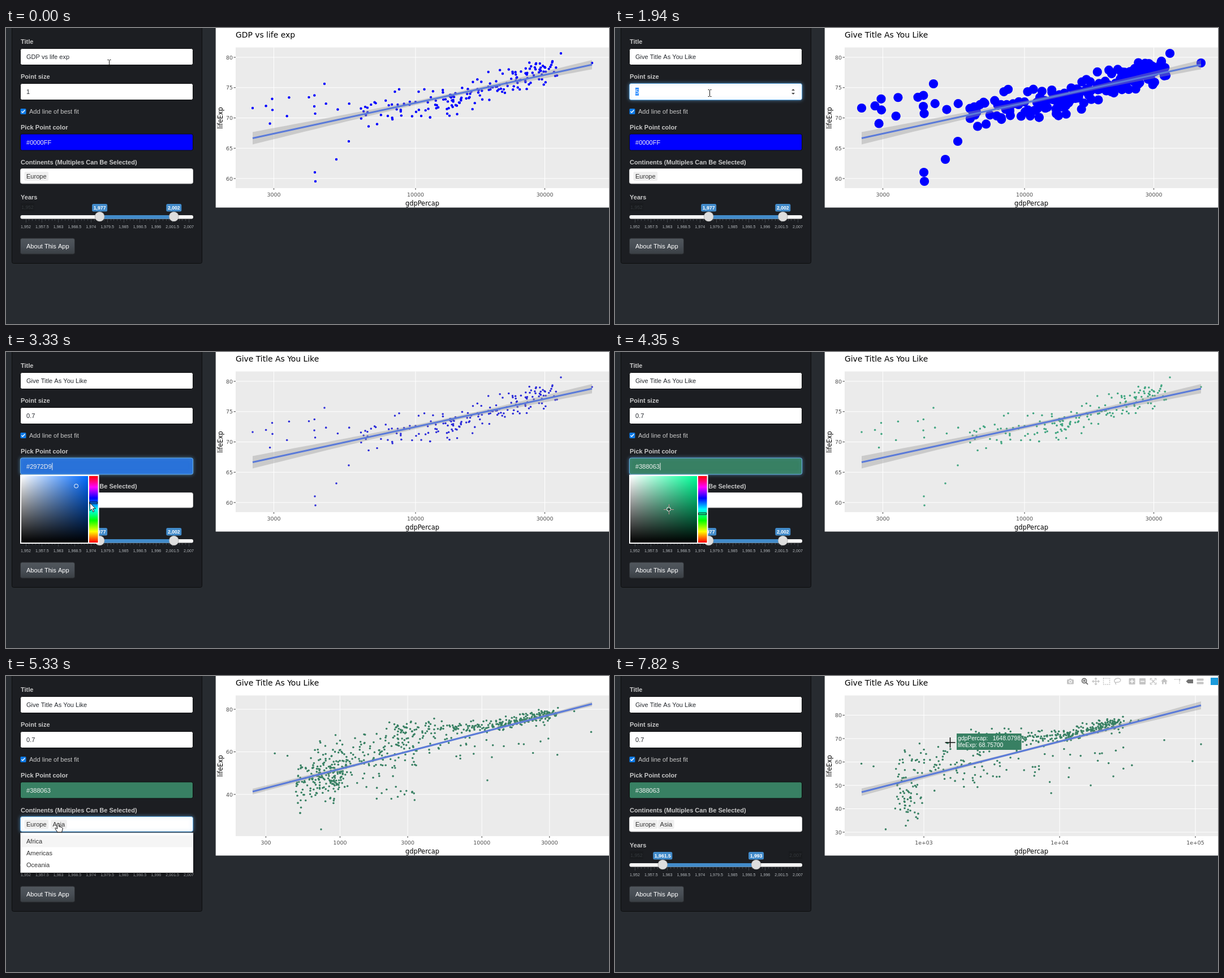
Write an HTML page with a canvas that moves like this. It is 1066x525 px and loops after 8000 ms.

```html
<!DOCTYPE html>
<html>
<head>
<meta charset="utf-8">
<style>
html, body { margin: 0; width: 100%; height: 100%; overflow: hidden; background: #272b30; }
canvas { display: block; }
</style>
</head>
<body>
<canvas id="stage" width="1066" height="525"></canvas>
<script>
const c = document.getElementById('stage').getContext('2d');
const SANS = '"Liberation Sans", Arial, sans-serif';
const WIDE = '"DejaVu Sans", Verdana, sans-serif';
const LOOP = 8000, GREEN = '#388063';

// ---- data ----
let seed = 11;
const rnd = () => {
  seed = seed + 0x6D2B79F5 | 0;
  let v = Math.imul(seed ^ seed >>> 15, 1 | seed);
  v = v + Math.imul(v ^ v >>> 7, 61 | v) ^ v;
  return ((v ^ v >>> 14) >>> 0) / 4294967296;
};
const gauss = sd => (rnd() + rnd() + rnd() - 1.5) * 2 * sd;

// x: pixel of 1000, k: pixels per decade, y: pixel of 80, q: pixels per year of life
// fit: line ends, ribbon half-width, where the ribbon is narrowest
const log3 = [300, 1000, 3000, 10000, 30000], tens = [30, 40, 50, 60, 70, 80];
const powers = [1e3, 1e4, 1e5];
const axes = {
  europe: { x: 245, k: 479, y: 52, q: 10.75, xt: log3.slice(2), yt: [60, 65, 70, 75, 80], fit: [195.5, 65, 11, .58] },
  africa: { x: 590.5, k: 250.7, y: 59, q: 3.775, xt: log3, yt: [40, 60, 80], fit: [205, 49.5, 5, .57] },
  asia: { x: 559.5, k: 268.5, y: 54.5, q: 4.46, xt: log3, yt: tens, fit: [179.5, 49.5, 6.5, .6] },
  early: { x: 546, k: 240, y: 69.5, q: 4.15, xt: powers, yt: tens, sci: true, fit: [206, 52, 6.5, .48] },
  wide: { x: 546, k: 240, y: 61, q: 4.32, xt: powers, yt: tens, sci: true, fit: [205, 44, 6, .48] }
};
const toX = (a, lg) => a.x + a.k * (lg - 3);
const toY = (a, life) => a.y + a.q * (80 - life);

// A few lone points, then clouds along a segment: count, x0, y0, x1, y1, spread
function sample(a, lone, ...clouds) {
  const pts = lone.split(' ').map(p => p.split(',').map(Number));
  for (const [n, x0, y0, x1, y1, sd] of clouds)
    for (let i = 0; i < n; i++) {
      const u = rnd();
      pts.push([x0 + (x1 - x0) * u + gauss(6), y0 + (y1 - y0) * u + gauss(sd)]);
    }
  return pts.map(([x, y]) => [3 + (x - a.x) / a.k, 80 - (y - a.y) / a.q]);
}
const europe = sample(axes.europe, '436,142 547,272 546,256 584,233 606,201 563,99 981,45 1036,62',
  [14, 440, 145, 640, 135, 14], [55, 630, 145, 800, 138, 15], [125, 775, 130, 975, 70, 12]);
const asia = sample(axes.asia, '436,147 460,152 484,272 847,155 971,150 1035,102',
  [24, 505, 190, 555, 210, 22], [62, 515, 155, 700, 108, 19], [55, 650, 100, 850, 93, 9],
  [36, 860, 84, 965, 66, 9], [18, 630, 170, 960, 125, 14]);
const africa = sample(axes.africa, '520,243 557,272 851,185',
  [165, 515, 190, 600, 170, 18], [90, 570, 178, 720, 130, 20], [25, 660, 115, 840, 110, 16], [12, 640, 205, 720, 208, 6]);
const past = sample(axes.early, '1036,121 1021,151 841,194 881,178',
  [32, 502, 185, 526, 235, 20], [38, 515, 165, 655, 170, 18], [14, 600, 195, 900, 160, 18]);

const sets = {
  europe, asia: [...europe, ...asia], africa: [...europe, ...asia, ...africa],
  wide: [...europe, ...asia, ...past],
  early: [...europe.map(([g, l]) => [g - .07, l - 1.3]), ...asia.filter(p => p[1] < 79), ...past]
};

// ---- timeline ----
const changes = [
  [0, { title: 'GDP vs life exp', field: 'GDP vs life exp', size: '1', dot: 1, color: '#0000ff', items: ['Europe'], plot: 'europe' }],
  [320, { focus: 'title' }],
  [390, { marked: 'title' }],
  [470, { field: 'Give Title As You Like', focus: 'size', marked: '' }],
  [790, { title: 'Give Title As You Like' }],
  [1100, { size: '2' }],
  [1330, { size: '3' }],
  [1490, { size: '5', fade: .25 }],
  [1720, { fade: .6 }],
  [1870, { dot: 5, fade: 0, marked: 'size' }],
  [2020, { size: '0.7', marked: '' }],
  [2420, { dot: .7 }],
  [2870, { focus: 'color', picker: true }],
  [3260, { color: '#2a2ad9' }],
  [3500, { color: '#2ad993' }],
  [4280, { color: '#40a580' }],
  [4510, { color: GREEN, picker: false, focus: '' }],
  [4660, { focus: 'items', rows: ['Asia'] }],
  [4810, { items: ['Europe', 'Asia'], rows: ['Africa', 'Americas', 'Oceania'], plot: 'asia' }],
  [4890, { items: ['Europe', 'Asia', 'Africa'], rows: ['Americas', 'Oceania'] }],
  [4970, { plot: 'africa' }],
  [5260, { items: ['Europe', 'Asia'], rows: ['Africa', 'Americas', 'Oceania'] }],
  [5480, { plot: 'asia' }],
  [5770, { rows: null, focus: '' }],
  [7100, { plot: 'wide' }],
  [7730, { plot: 'early' }],
  [7820, { hover: true }]
];

// Each move: start, end, then the values reached
const pointer = [[0, 0, 182, 62, 'beam'], [320, 395, 5, 50, 'beam'], [400, 470, 300, 112, 'beam'],
  [620, 790, 319, 106, 'arrow'], [1870, 1870, 167, 115, 'beam'], [2250, 2250, 175, 115, 'beam'],
  [2420, 2720, 125, 200, 'pale'], [3020, 3420, 155, 287, 'arrow'], [3730, 4120, 95, 279, 'aim'],
  [4510, 4740, 180, 263, 'beam'], [4750, 4820, 62, 288, 'hand'], [4970, 5130, 92, 261, 'hand'],
  [5410, 5910, 165, 331, 'hand'], [6232, 6780, 125, 331, 'hand'], [6930, 7100, 84, 331, 'hand'],
  [7110, 7190, 297, 331, 'hand'], [7350, 7580, 249, 331, 'hand'], [7600, 7820, 592, 118, 'cross']];
const pick = [[0, 0, 1, 1, 240], [3020, 3180, .81, .85, 240], [3260, 3500, .81, .85, 155.83], [3730, 4120, .5625, .502, 155.83]];
const low = [[0, 0, 1977], [6232, 6780, 1969.5], [6930, 7100, 1961.5]];
const high = [[0, 0, 2002], [7350, 7580, 1993]];

function follow(moves, t) {
  const i = moves.findLastIndex(m => m[0] <= t);
  const [t0, t1, ...to] = moves[i], from = moves[Math.max(0, i - 1)].slice(2);
  const u = t >= t1 ? 1 : (t - t0) / (t1 - t0);
  return to.map((v, j) => typeof v === 'number' ? from[j] + (v - from[j]) * u : v);
}

// ---- drawing helpers ----
function text(s, x, y, color, size = 11.06, align = 'left', bold = false, font = SANS) {
  c.font = `${bold ? 'bold ' : ''}${size}px ${font}`;
  c.textAlign = align;
  c.fillStyle = color;
  c.fillText(s, x, y);
}
function rect(x, y, w, h, color) { c.fillStyle = color; c.fillRect(x, y, w, h); }
function box(x, y, w, h, r, color, edge) {
  c.beginPath();
  c.roundRect(x, y, w, h, r);
  c.fillStyle = color;
  c.fill();
  if (edge) { c.strokeStyle = edge; c.lineWidth = 1; c.stroke(); }
}
function disc(x, y, r, color) {
  c.beginPath();
  c.arc(x, y, r, 0, 7);
  c.fillStyle = color;
  c.fill();
}
function path(d, x, y, color, edge, width = 1) {
  c.save();
  c.translate(x, y);
  const p = new Path2D(d);
  if (color) { c.fillStyle = color; c.fill(p); }
  if (edge) { c.strokeStyle = edge; c.lineWidth = width; c.stroke(p); }
  c.restore();
}
function ramp(x0, y0, x1, y1, stops) {
  const g = c.createLinearGradient(x0, y0, x1, y1);
  stops.forEach((s, i) => g.addColorStop(i / (stops.length - 1), s));
  return g;
}
function hex([s, v, h]) {
  const ch = n => {
    const k = (n + h / 60) % 6;
    return Math.round(255 * v * (1 - s * Math.max(0, Math.min(k, 4 - k, 1)))).toString(16).padStart(2, '0');
  };
  return '#' + ch(5) + ch(3) + ch(1);
}

// ---- side panel ----
function input(y, s, name, color = '#fff', h = 29, edge = '#0c0d0e') {
  const on = s.focus === name;
  c.save();
  if (on) { c.shadowColor = 'rgba(102,175,233,.6)'; c.shadowBlur = 6; }
  box(25.5, y, 305, h, 3, color, on ? '#66afe9' : edge);
  c.restore();
}
function value(s, name, str, y, color, t) {
  c.font = `11.06px ${SANS}`;
  const w = c.measureText(str).width;
  if (s.marked === name) { rect(36, y - 11, w, 14, '#3390ff'); color = '#fff'; }
  text(str, 36, y, color);
  if (s.focus === name && s.marked !== name && Math.floor(t / 530) % 2 === 0) rect(36.5 + w, y - 10, 1, 13, color);
}
const label = (s, y) => text(s, 26, y, '#c8c8c8', 11.06, 'left', true);

function slider(lo, hi) {
  const px = v => 34.5 + (v - 1952) * 5.245;
  const name = v => v.toLocaleString('en-US');
  const limit = (v, x) => {
    box(x - 12, 310.5, 24, 14, 2, '#191b1e');
    text(name(v), x, 321, '#34383c', 8.7, 'center');
  };
  limit(1952, 38);
  if (hi < 1998) limit(2007, 319);
  for (let i = 0; i <= 50; i++) rect(Math.round(34.5 + i * 5.77), 339, 1, i % 5 ? 3 : 6, '#42474c');
  for (let i = 0; i <= 10; i++) text(name(1952 + i * 5.5), 35 + i * 28.8, 354.5, '#b4b8bc', 7.1, 'center');
  box(25.5, 332, 305.5, 6.5, 3, '#f4f4f4');
  rect(px(lo), 332, px(hi) - px(lo), 6.5, '#428bca');
  for (const v of [lo, hi]) {
    const x = px(v), w = v % 1 ? 34 : 27;
    box(x - w / 2, 312, w, 13.5, 2.5, '#428bca');
    text(name(v), x, 321.6, '#fff', 8.7, 'center', true);
    disc(x, 334.5, 8.7, '#a9a9a9');
    disc(x, 334.5, 8, '#dedede');
  }
}

function picker([s, v, h]) {
  rect(25, 217.5, 139.5, 122.5, '#fff');
  rect(27, 220, 118, 118, hex([1, 1, h]));
  rect(27, 220, 118, 118, ramp(27, 0, 145, 0, ['#fff', 'rgba(255,255,255,0)']));
  rect(27, 220, 118, 118, ramp(0, 220, 0, 338, ['rgba(0,0,0,0)', '#000']));
  rect(147, 220, 15.5, 118, ramp(0, 220, 0, 338, ['#f00', '#f0f', '#00f', '#0ff', '#0f0', '#ff0', '#f00']));
  c.strokeStyle = '#111';
  c.lineWidth = 1;
  c.strokeRect(147.5, 338 - h / 360 * 118 - 1.5, 14, 3);
  c.beginPath();
  c.arc(28.5 + 118 * s, 220 + 118 * (1 - v), 3.5, 0, 7);
  c.strokeStyle = '#fff';
  c.stroke();
}

function items(s) {
  let x = 32.5;
  c.font = `11.06px ${SANS}`;
  for (const it of s.items) {
    const w = c.measureText(it).width;
    box(x, 255, w + 7, 16, 2, '#efefef');
    text(it, x + 3.5, 267, '#333');
    x += w + 8 + (s.focus === 'items' ? 3 : 0);
  }
}

function dropdown(rows) {
  c.save();
  c.shadowColor = 'rgba(0,0,0,.5)';
  c.shadowBlur = 6;
  c.shadowOffsetY = 3;
  rect(25.5, 278, 305.5, 8.5 + rows.length * 20.8, '#fff');
  c.restore();
  rect(26, 282.5, 304.5, 21, '#f5f5f5');
  rows.forEach((r, i) => text(r, 36, 297 + i * 20.8, '#333'));
}

function panel(s, t) {
  box(10.5, -4, 336, 421.5, 3, '#1c1e22', '#0c0d0e');
  label('Title', 27.5);
  input(36.5, s, 'title');
  value(s, 'title', s.field, 54.7, '#272b30', t);
  label('Point size', 89.5);
  input(98.5, s, 'size');
  value(s, 'size', s.size, 116.8, '#272b30', t);
  if (s.focus === 'size') {
    if (follow(pointer, t)[2] === 'arrow') rect(309, 106.5, 12, 12.5, '#e2e2e2');
    path('M-3 -2L0 -5L3 -2ZM-3 2L0 5L3 2Z', 315, 113, '#444');
  }
  box(25.5, 143, 10, 10, 1.5, '#0e7ae6');
  path('M2 5L4 7L8 2.5', 25.5, 143, null, '#fff', 1.5);
  text('Add line of best fit', 41, 152, '#c8c8c8');
  label('Pick Point color', 179.5);
  const picked = follow(pick, t), code = hex(picked);
  input(188, s, 'color', code);
  value(s, 'color', code.toUpperCase(), 206.6, '#f0f0f0', t);
  label('Continents (Multiples Can Be Selected)', 241.5);
  input(249.5, s, 'items', '#fff', 26.5, '#ccc');
  items(s);
  label('Years', 304);
  slider(...[low, high].map(m => Math.round(follow(m, t)[0] * 2) / 2));
  box(25.5, 373, 96, 28, 3, ramp(0, 373, 0, 401, ['#51575d', '#484e55', '#3a3f44']), '#2a2d31');
  text('About This App', 36, 391, '#fff');
  if (s.picker) picker(picked);
  if (s.rows) dropdown(s.rows);
}

// ---- chart ----
function grid(a) {
  const tick = (v, x, y, align) => text(v, x, y, '#4d4d4d', 9.4, align, false, WIDE);
  rect(406, 34.5, 660, 249.5, '#ebebeb');
  for (const v of a.xt) {
    const x = toX(a, Math.log10(v));
    rect(x - .5, 34.5, 1, 249.5, '#fff');
    rect(x - .5, 284, 1, 3, '#444');
    tick(a.sci ? '1e+0' + Math.log10(v) : v, x, 299, 'center');
  }
  for (const v of a.yt) {
    const y = toY(a, v);
    rect(406, y - .5, 660, 1, '#fff');
    rect(402.5, y - .5, 3.5, 1, '#444');
    tick(v, 401, y + 3.5, 'right');
  }
}

function trend([y0, y1, half, mid]) {
  const edge = (u, side) => c.lineTo(436 + 600 * u,
    y0 + (y1 - y0) * u + side * Math.hypot(half * .3, half * .95 * (u - mid) / mid));
  c.beginPath();
  for (let i = 0; i <= 40; i++) edge(i / 40, -1);
  for (let i = 40; i >= 0; i--) edge(i / 40, 1);
  c.fillStyle = 'rgba(153,153,153,.4)';
  c.fill();
  path(`M436 ${y0}L1036 ${y1}`, 0, 0, null, '#5b7bd9', 3);
}

function chart(s) {
  const a = axes[s.plot];
  rect(370.7, 0, 696, 318.5, '#fff');
  grid(a);
  const r = .39 * (3.78 * s.dot + 1.89);
  for (const [g, l] of sets[s.plot]) {
    const x = toX(a, g), y = toY(a, l);
    if (y > 44 && y < 274 && x > 434 && x < 1038) disc(x, y, r, s.color);
  }
  trend(a.fit);
  text(s.title, 406, 17, '#000', 13.9, 'left', false, WIDE);
  text('gdpPercap', 736, 315, '#000', 11.4, 'center', false, WIDE);
  c.save();
  c.translate(383, 159.5);
  c.rotate(-Math.PI / 2);
  text('lifeExp', 0, 0, '#000', 11.4, 'center', false, WIDE);
  c.restore();
  if (s.fade) rect(371, 0, 695, 318, `rgba(255,255,255,${s.fade})`);
  if (s.hover) hover();
}

function hover() {
  const pale = '#c4c4c4', dark = '#737373';
  box(799, 6, 12, 8.5, 1.5, pale);
  box(803, 4.5, 4, 3, 1, pale);
  disc(805, 10, 2.8, '#fff');
  disc(805, 10, 1.6, pale);
  path('M3.5 -1A4 4 0 1 1 -4.5 -1A4 4 0 1 1 3.5 -1M2.5 2L6 5.5M-2.5 -1H1.5M-.5 -3V1', 830, 9.5, null, dark, 1.8);
  path('M-5.5 0H5.5M0 -5.5V5.5M-2 -4L0 -6L2 -4M-2 4L0 6L2 4M-4 -2L-6 0L-4 2M4 -2L6 0L4 2', 850, 9.5, null, pale, 1.3);
  c.setLineDash([2, 1.5]);
  path('M-5.5 -5.5H5.5V5.5H-5.5Z', 869, 9.5, null, pale, 1.4);
  c.setLineDash([]);
  path('M-3 3C-8 0 -4 -5 1 -5C8 -5 7 2 0 2C-4 2 -4 4 -2 6', 888, 9, null, pale, 1.5);
  for (const x of [914, 932.5]) {
    box(x - 5.5, 4, 11, 11, 1, pale);
    rect(x - 3.5, 8.7, 7, 1.6, '#fff');
  }
  rect(913.2, 6, 1.6, 7, '#fff');
  path('M-5 -2V-5H-2M2 -5H5V-2M5 2V5H2M-2 5H-5V2M-3 -3L3 3M3 -3L-3 3', 951.5, 9.5, null, pale, 1.5);
  path('M-6 0L0 -5.5L6 0H4V5H1.2V1.5H-1.2V5H-4V0Z', 971, 9.5, pale);
  c.setLineDash([2, 1.5]);
  path('M-5 -3H3M4 -1V5', 994, 9, null, pale, 1.5);
  c.setLineDash([]);
  rect(997, 5, 2.5, 2.5, pale);
  path('M-6.5 0L-3 -3.5H6V3.5H-3Z', 1016, 9.5, dark);
  for (const y of [4.5, 10.5]) box(1028.5, y, 12, 4, 1, pale);
  rect(1053, 3, 13, 13, '#1a9bdc');
  rect(604, 102, 114.5, 29, GREEN);
  text('gdpPercap:   1648.0798', 606, 114, '#fff', 10.4);
  text('lifeExp: 68.75700', 606, 126.3, '#fff', 10.4);
}

function cursor([x, y, kind]) {
  const beam = 'M-3 -6H-1L0 -5L1 -6H3M0 -5V5M-3 6H-1L0 5L1 6H3';
  if (kind === 'beam') path(beam, x + .5, y + .5, null, '#111');
  if (kind === 'pale') path(beam, x + .5, y + .5, null, '#d8d8a0');
  if (kind === 'arrow') path('M0 0V14L3.2 11L5.4 16L7.6 15L5.4 10.2H10Z', x, y, '#fff', '#111');
  if (kind === 'hand') path('M-1.5 1Q0 -1 1.5 1V6L7 7.5Q8.5 8 8 11L6.5 16H-1L-5 10Q-5 8 -3.5 8.5L-1.5 10Z', x, y, '#fff', '#111');
  if (kind === 'aim') {
    path('M-9 .5H-3M3 .5H9M.5 -9V-3M.5 3V9', x, y, null, '#c58f92');
    path('M-2 .5H3M.5 -2V3', x, y, null, '#222');
  }
  if (kind === 'cross') path('M-9 0H9M0 -9V9', x + .5, y, null, '#111', 1.6);
}

function draw(t) {
  const s = Object.assign({}, ...changes.filter(k => k[0] <= t).map(k => k[1]));
  rect(0, 0, 1066, 525, '#272b30');
  chart(s);
  panel(s, t);
  cursor(follow(pointer, t));
}
const start = performance.now();
function loop() {
  draw((performance.now() - start) % LOOP);
  requestAnimationFrame(loop);
}
loop();
</script>
</body>
</html>
```
